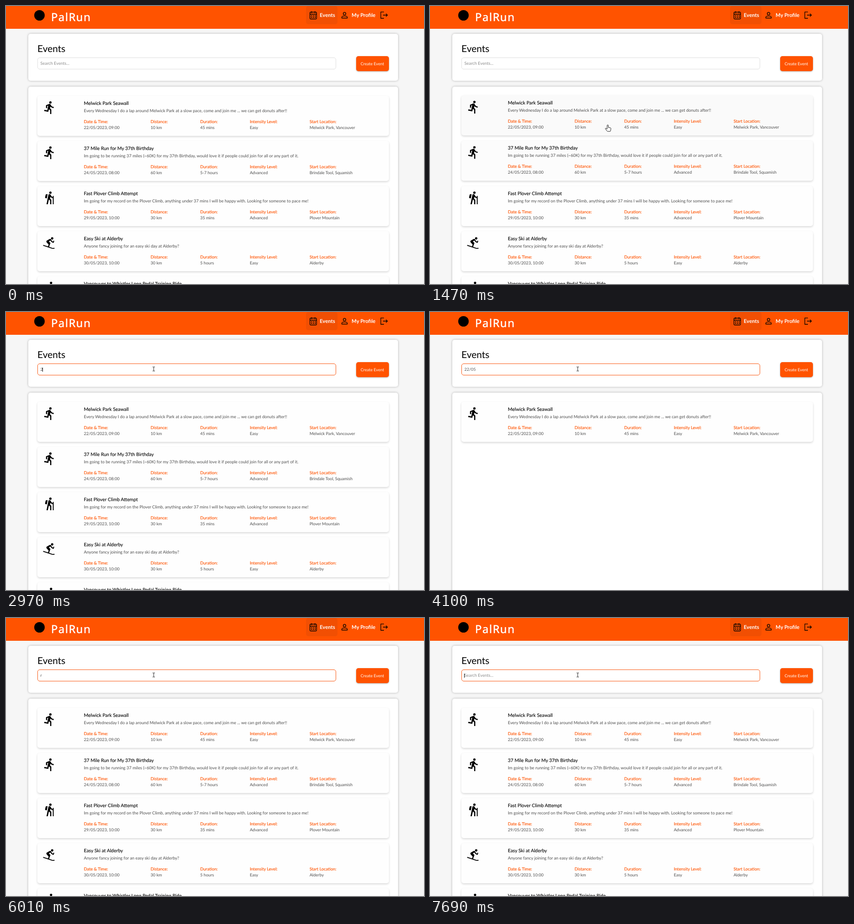
Recreate the animation shown at these times as an HTML page. Size 918 by 610 pixels, loop 8000 ms.

```html
<!DOCTYPE html>
<html lang="en">
<head>
<meta charset="utf-8">
<title>Events</title>
<style>
  html, body { margin: 0; width: 100%; height: 100%; overflow: hidden; }
  #stage {
    position: relative; width: 918px; height: 610px; overflow: hidden;
    background: #f6f6f6; color: #000;
    font: 9.25px/20px Lato, "Open Sans", sans-serif;
    text-rendering: geometricPrecision;
  }
  #stage div, #stage svg { position: absolute; box-sizing: border-box; }
  .t { height: 20px; white-space: pre; }

  #bar { left: 0; top: 0; width: 918px; height: 50px; background: #ff5300; }
  #tab { left: 659px; top: 0; width: 69px; height: 40px; border-radius: 5px; background: #f14f03; }
  #mark { left: 62px; top: 9px; width: 23px; height: 23px; border-radius: 50%; background: #000; }
  .brand {
    color: #fff; font: 500 24px/20px "Noto Sans", sans-serif;
    letter-spacing: 1.5px; -webkit-text-stroke: .5px;
  }
  .nav { color: #fff; font-size: 11.4px; font-weight: 700; }
  .line { fill: none; stroke: #000; stroke-width: 1.3; }

  .panel {
    left: 49px; width: 812px; background: #fff; border-radius: 5px;
    box-shadow: 0 0 5px rgba(0, 0, 0, .27);
  }
  .head { font-size: 21px; }
  #field {
    left: 69px; top: 113px; width: 656px; height: 26px;
    border: 1px solid #dedede; border-radius: 5px; background: #fff;
  }
  #field.on { border: 1.6px solid #f9560f; }
  #query { font-size: 9px; color: #555; }
  #query.empty { font-size: 9.3px; color: #8a8a8a; }
  #caret { top: 122px; width: 1px; height: 9px; background: #000; }
  #create {
    left: 768.5px; top: 109.5px; width: 72px; height: 33.5px; border-radius: 5px;
    background: #ff5300; color: #fff; font-size: 9.1px; line-height: 33px; text-align: center;
    box-shadow: 0 1px 3px rgba(0, 0, 0, .3);
  }

  .card {
    left: 69px; width: 772px; height: 88px; border-radius: 5px; background: #fefefe;
    box-shadow: 0 2px 4px rgba(0, 0, 0, .16);
  }
  .card svg { left: 10.7px; top: 9.6px; width: 31.2px; height: 31.2px; }
  .title { font-size: 10.4px; -webkit-text-stroke: .1px; }
  .desc { color: #4c4c4c; }
  .label { font-size: 9.25px; color: #ff5300; -webkit-text-stroke: .15px; }
  .value { font-size: 9.1px; color: #4c4c4c; }

  #cursor { left: 0; top: 0; width: 1px; height: 1px; overflow: visible; }
  #cursor path { fill: #fff; stroke: #000; stroke-width: .9; stroke-linejoin: round; }
  #cursor #ibeam { fill: none; stroke: #222; stroke-width: 1; }
</style>
</head>
<body>
<div id="stage">
  <div id="bar"></div>
  <div id="tab"></div>
  <div id="mark"></div>
  <svg width="918" height="50" class="line">
    <rect x="667.5" y="13.5" width="14.5" height="15" rx="1.5"/>
    <path d="M667.5 18h14.5M671 11.5v4M678.5 11.5v4"/>
    <path d="M670 21.5h10M670 25h10" stroke-width="1.8" stroke-dasharray="2 2"/>
    <circle cx="743.5" cy="16.7" r="2.9"/>
    <path d="M737.5 26.5v-1.6c0-4 12-4 12 0v1.6z"/>
    <path d="M830 13.2h-6.8v13.8h6.8M828 20h9.5M834.3 16.6l3.4 3.4-3.4 3.4"/>
  </svg>
  <div class="panel" style="top:61px;height:103px"></div>
  <div class="panel" style="top:176.5px;height:520px"></div>
  <div id="field"></div>
  <div id="create">Create Event</div>
  <div id="query" class="t" style="left:75.6px;top:116px"></div>
  <div id="caret"></div>
</div>
<script>
const LOOP = 8000;
const stage = document.getElementById('stage');
const $ = id => document.getElementById(id);

function text(parent, x, mid, cls, str) {
  const el = document.createElement('div');
  el.className = 't ' + cls;
  el.style.left = x + 'px';
  el.style.top = mid - 10 + 'px';
  el.textContent = str;
  parent.append(el);
}

text(stage, 99, 25, 'brand', 'PalRun');
text(stage, 689, 21, 'nav', 'Events');
text(stage, 759, 21, 'nav', 'My Profile');
text(stage, 69, 93.5, 'head', 'Events');

const head = (x, y) => `<circle cx="${x}" cy="${y}" r="2"/>`;
const icons = {
  run: head(13.5, 3.5) + '<path d="M9.9 19.4l1-4.4 2.1 2v6h2v-7.5l-2.1-2 .6-3c1.3 1.5 3.3 2.5 5.5 2.5v-2c-1.9 0-3.5-1-4.3-2.4l-1-1.6c-.4-.6-1-1-1.7-1-.3 0-.5.1-.8.1L6 8.3V13h2V9.6l1.8-.7-1.6 8.1-4.9-1-.4 2z"/>',
  hike: head(13.5, 3.5) + '<path d="M17.5 10.8c-1.2-.4-2.2-1.2-2.8-2.2l-1-1.6c-.4-.6-1.1-1-1.8-1-.8 0-1.6.5-1.8 1.4S7 23 7 23h2.1l1.8-8 2.1 2v6h2v-7.5l-2.1-2 .6-3c1 1.2 2.4 2 4 2.3V23H19V9h-1.5zM7.4 13.1l-2.1-.4c-.5-.1-.9-.6-.8-1.1l.8-4c.2-1.1 1.3-1.8 2.3-1.6l1.2.3z"/>',
  ski: head(16.5, 4.5) + '<path d="M1 17l.5-1.4 7.9 2.5 1.1-3.1-3.3-3.7c-.9-1-.6-2.6.5-3.2L12 5.7c1-.6 2.3-.1 2.75.9l.5 1.1c.5 1.2 1.6 2 2.9 2.3l.5-1.7 1.4.5-1.1 3.4c-2.4-.4-4.4-2-5.5-4.1l-2.5 1.5 2.6 3-2.3 6.1 4.6 1.6.8.2c1 .4 2.2.3 3.1-.1l1.1 1.1c-1.4.8-3.1.9-4.7.4z"/>',
  ride: head(14.6, 3.5)
};

const columns = [
  [171, 'Date & Time:'], [317.5, 'Distance:'], [426.5, 'Duration:'],
  [535.5, 'Intensity Level:'], [666.7, 'Start Location:']
];

const events = [
  ['run', 'Melwick Park Seawall',
    'Every Wednesday I do a lap around Melwick Park at a slow pace, come and join me ... we can get donuts after!!',
    '22/05/2023, 09:00', '10 km', '45 mins', 'Easy', 'Melwick Park, Vancouver'],
  ['run', '37 Mile Run for My 37th Birthday',
    'Im going to be running 37 miles (~60K) for my 37th Birthday, would love it if people could join for all or any part of it.',
    '24/05/2023, 08:00', '60 km', '5-7 hours', 'Advanced', 'Brindale Tool, Squamish'],
  ['hike', 'Fast Plover Climb Attempt',
    'Im going for my record on the Plover Climb, anything under 37 mins I will be happy with. Looking for someone to pace me!',
    '29/05/2023, 10:00', '30 km', '35 mins', 'Advanced', 'Plover Mountain'],
  ['ski', 'Easy Ski at Alderby',
    'Anyone fancy joining for an easy ski day at Alderby?',
    '30/05/2023, 10:00', '30 km', '5 hours', 'Easy', 'Alderby'],
  ['ride', 'Vancouver to Whistler Long Pedal Training Ride', '', '31/05/2023, 10:00']
];

const cards = events.map(([type, title, desc, ...values]) => {
  const el = document.createElement('div');
  el.className = 'card';
  el.innerHTML = `<svg viewBox="0 0 24 24">${icons[type]}</svg>`;
  text(el, 102, 16.6, 'title', title);
  text(el, 102, 33.4, 'desc', desc);
  values.forEach((value, i) => {
    const [x, label] = columns[i];
    text(el, x - 69, 57.2, 'label', label);
    text(el, x - 69, 70.4, 'value', value);
  });
  stage.append(el);
  return { el, words: [type, title, desc, ...values].join('|').toLowerCase() };
});

stage.insertAdjacentHTML('beforeend', `<svg id="cursor">
  <path id="arrow" d="M0 0v13l3-2.8 2 4.6 2-.9-2-4.4h4.2z"/>
  <path id="hand" d="M-1.5.9c0-1.3 2.6-1.3 2.6 0v4.4l4.3.9c1.1.2 1.6.9 1.4 1.9l-.7 4.6c-.1.9-.5 1.4-1.3 1.4h-5c-.6 0-1.1-.3-1.5-.8l-3.6-4.6c-.7-1.1.5-2.1 1.5-1.3l2.3 1.7z"/>
  <path id="ibeam" d="M-2.5-4.5h2l.5.5.5-.5h2M0-4v8M-2.5 4.5h2l.5-.5.5.5h2"/>
</svg>`);

// Search box over time: [start, text, caret visible]
const typing = [
  [0, '', 0], [1900, '', 1], [2270, '', 0], [2620, '', 1],
  [2970, '2', 1], [3140, '22', 1], [3340, '22/', 1], [3500, '22/0', 1], [3670, '22/05', 1],
  [4100, '22/05', 0], [4190, '22/0', 0], [4270, '22/', 0], [4360, '22', 0], [4450, '2', 1],
  [4620, '', 1], [4800, '', 0],
  [5150, 'r', 1], [5240, 'ru', 1], [5320, 'run', 1], [5760, 'run', 0],
  [5940, 'ru', 0], [6010, 'r', 0], [6100, '', 1], [6450, '', 0],
  [6640, 'a', 0], [6810, 'ad', 1], [6980, 'adv', 1], [7250, 'adv', 0],
  [7340, 'ad', 0], [7430, 'a', 0], [7530, '', 0], [7690, '', 1]
];
const FOCUS = 1900;

// Pointer path: [time, x, y]
const START = 620, STEP = 85;
const route = [
  [START, 882, 598], [960, 600, 520], [1045, 505, 442], [1215, 435, 350],
  [1385, 403, 303], [1470, 390, 261], [1640, 338, 160], [1725, 324, 125]
];

// Pointer enters and leaves each card
const hovers = [[1400, 1585], [1215, 1400], [960, 1215], [740, 1030]];

const clamp = v => Math.max(0, Math.min(1, v));

function pointerAt(t) {
  const q = START + Math.floor((t - START) / STEP) * STEP;
  const i = route.findIndex(p => p[0] > q);
  if (i < 0) return route[route.length - 1].slice(1);
  const [a, ax, ay] = route[i - 1], [b, bx, by] = route[i];
  const k = (q - a) / (b - a);
  return [ax + (bx - ax) * k, ay + (by - ay) * k];
}

function drawPointer(t) {
  const cursor = $('cursor');
  cursor.style.display = t < START ? 'none' : '';
  if (t < START) return;
  const [x, y] = pointerAt(t);
  const overField = y > 113 && y < 139 && x < 725;
  const overCard = y > 197 && x < 841;
  const shape = overField ? 'ibeam' : overCard ? 'hand' : 'arrow';
  for (const id of ['arrow', 'hand', 'ibeam']) $(id).style.display = id === shape ? '' : 'none';
  cursor.style.transform = `translate(${x + .5}px, ${y}px)`;
}

function drawCards(t, word) {
  let row = 0;
  cards.forEach(({ el, words }, i) => {
    const shown = words.includes(word);
    el.style.display = shown ? '' : 'none';
    if (!shown) return;
    el.style.top = 197 + 99 * row++ + 'px';
    const [enter, leave] = hovers[i] || [LOOP, LOOP];
    const lift = clamp((t - enter) / 70) - clamp((t - leave) / 150);
    const shade = 254 - 4 * lift;
    el.style.transform = lift > 0 ? `translateY(${-lift}px)` : '';
    el.style.background = `rgb(${shade}, ${shade}, ${shade})`;
  });
}

function draw(t) {
  const [, word, caret] = typing.filter(k => k[0] <= t).pop();
  const query = $('query');
  query.textContent = word || 'Search Events...';
  query.classList.toggle('empty', !word);
  $('field').classList.toggle('on', t >= FOCUS);
  $('caret').style.display = caret ? '' : 'none';
  $('caret').style.left = Math.floor(75.6 + (word ? query.getBoundingClientRect().width : 0)) + 'px';
  drawCards(t, word);
  drawPointer(t);
}

const begin = performance.now();
function tick() {
  draw((performance.now() - begin) % LOOP);
  requestAnimationFrame(tick);
}
tick();
</script>
</body>
</html>
```
